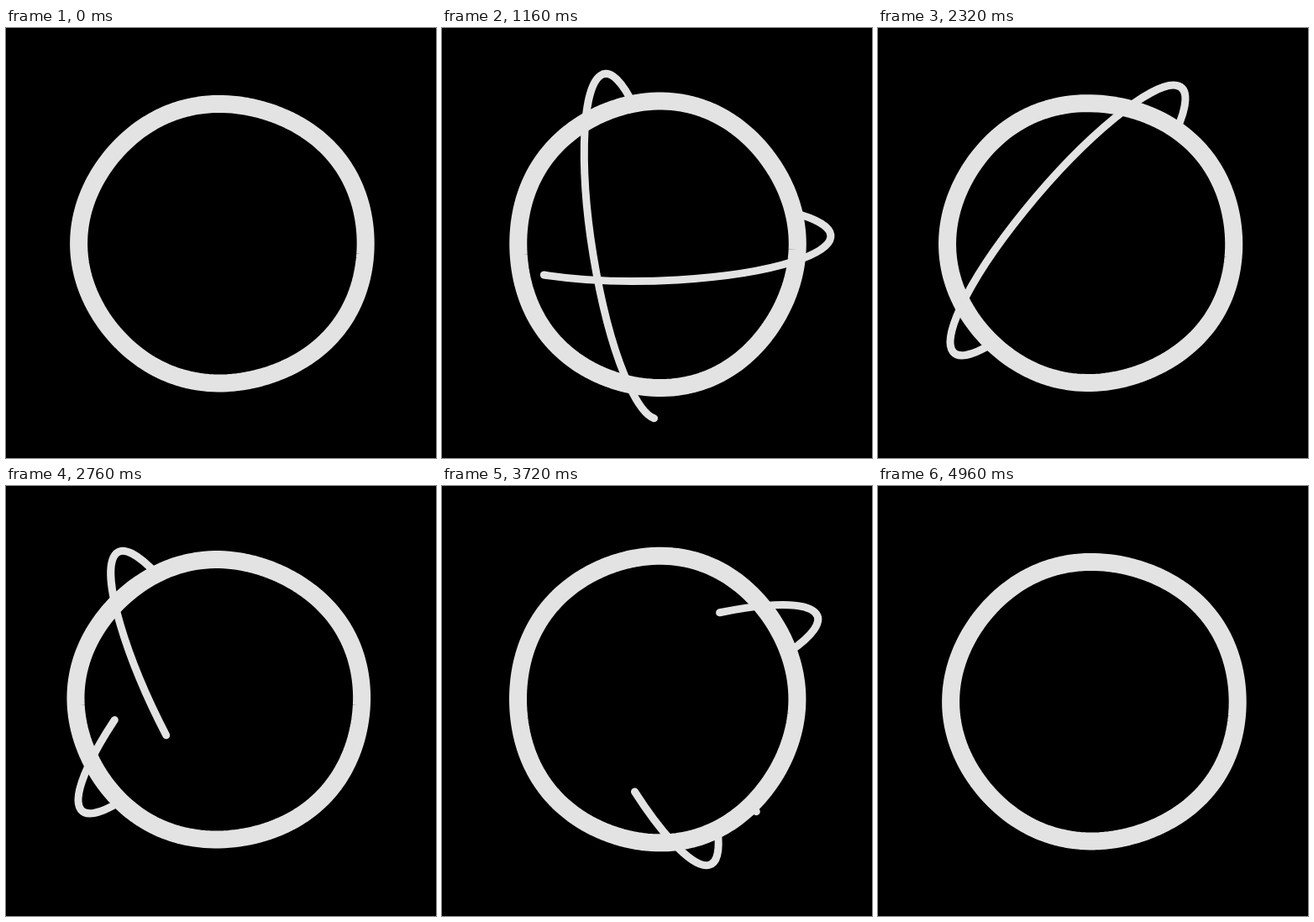
An HTML page with a canvas that plays this animation: 512 px wide and 512 px high, repeating every 5 s.

```html
<!DOCTYPE html>
<html lang="en">
<head>
<meta charset="utf-8">
<title>Orbits</title>
<style>
  html, body { margin: 0; width: 100%; height: 100%; overflow: hidden; background: #000; }
  canvas { display: block; }
</style>
</head>
<body>
<canvas id="stage" width="512" height="512"></canvas>
<script>
const ctx = document.getElementById('stage').getContext('2d');
const { PI, sin, cos, hypot } = Math;
const LOOP = 5000, CENTER = 256, RADIUS = 168.5;

// Every orbit is the same flat ellipse; its ends tuck in behind the ring.
const LONG = 208, SHORT = 47, SWEEP = 750;
const FIRST = PI + 0.67, LAST = -0.58;

// angle: direction of travel in degrees; appear and vanish: when each end sets off.
const orbits = [
  { x: 255, y: 254,   angle: -1.8,  appear: 208,  vanish: 905 },
  { x: 226, y: 260,   angle: 81,    appear: 560,  vanish: 1446 },
  { x: 226, y: 229,   angle: 130.6, appear: 1391, vanish: 2290 },
  { x: 227, y: 264.5, angle: 63.4,  appear: 2370, vanish: 3260 },
  { x: 250, y: 221.5, angle: 161.4, appear: 3430, vanish: 4205 },
  { x: 282, y: 245.5, angle: 227.5, appear: 3679, vanish: 4205 }
];

function arcLength() {
  const steps = 400, step = (FIRST - LAST) / steps;
  let sum = 0;
  for (let i = 0; i < steps; i++) {
    const phi = LAST + (i + 0.5) * step;
    sum += hypot(LONG * sin(phi), SHORT * cos(phi)) * step;
  }
  return sum;
}
const LENGTH = arcLength();

function ease(u) {
  return (1 - cos(PI * Math.max(0, Math.min(1, u)))) / 2;
}

// A circle that drifts, breathes between wide and tall, and ripples slightly.
function drawRing(t) {
  const turn = 2 * PI * t / LOOP;
  const x = CENTER + 2.2 * cos(turn);
  const y = CENTER + 2 * sin(turn + 0.35);
  const stretch = 2.3 * cos(2 * turn);
  ctx.beginPath();
  for (let i = 0; i < 180; i++) {
    const a = i * PI / 90;
    const r = RADIUS + stretch * cos(2 * a) - 0.8 * cos(5 * a - 2 * turn);
    ctx.lineTo(x + r * cos(a), y + r * sin(a));
  }
  ctx.closePath();
  ctx.setLineDash([]);
  ctx.lineWidth = 21;
  ctx.stroke();
}

function drawOrbit({ x, y, angle, appear, vanish }, t) {
  const head = LENGTH * ease((t - appear) / SWEEP);
  const tail = LENGTH * ease((t - vanish) / SWEEP);
  if (head - tail < 0.5) return;
  ctx.beginPath();
  ctx.ellipse(x, y, LONG, SHORT, angle * PI / 180, FIRST, LAST, true);
  ctx.setLineDash([head - tail, 2 * LENGTH]);
  ctx.lineDashOffset = -tail;
  ctx.lineWidth = 9;
  ctx.stroke();
}

function draw(t) {
  ctx.fillStyle = '#000';
  ctx.fillRect(0, 0, 512, 512);
  ctx.strokeStyle = '#e3e3e3';
  ctx.lineCap = ctx.lineJoin = 'round';
  drawRing(t);
  for (const orbit of orbits) drawOrbit(orbit, t);
}

const began = performance.now();
function tick() {
  draw((performance.now() - began) % LOOP);
  requestAnimationFrame(tick);
}
tick();
</script>
</body>
</html>
```
